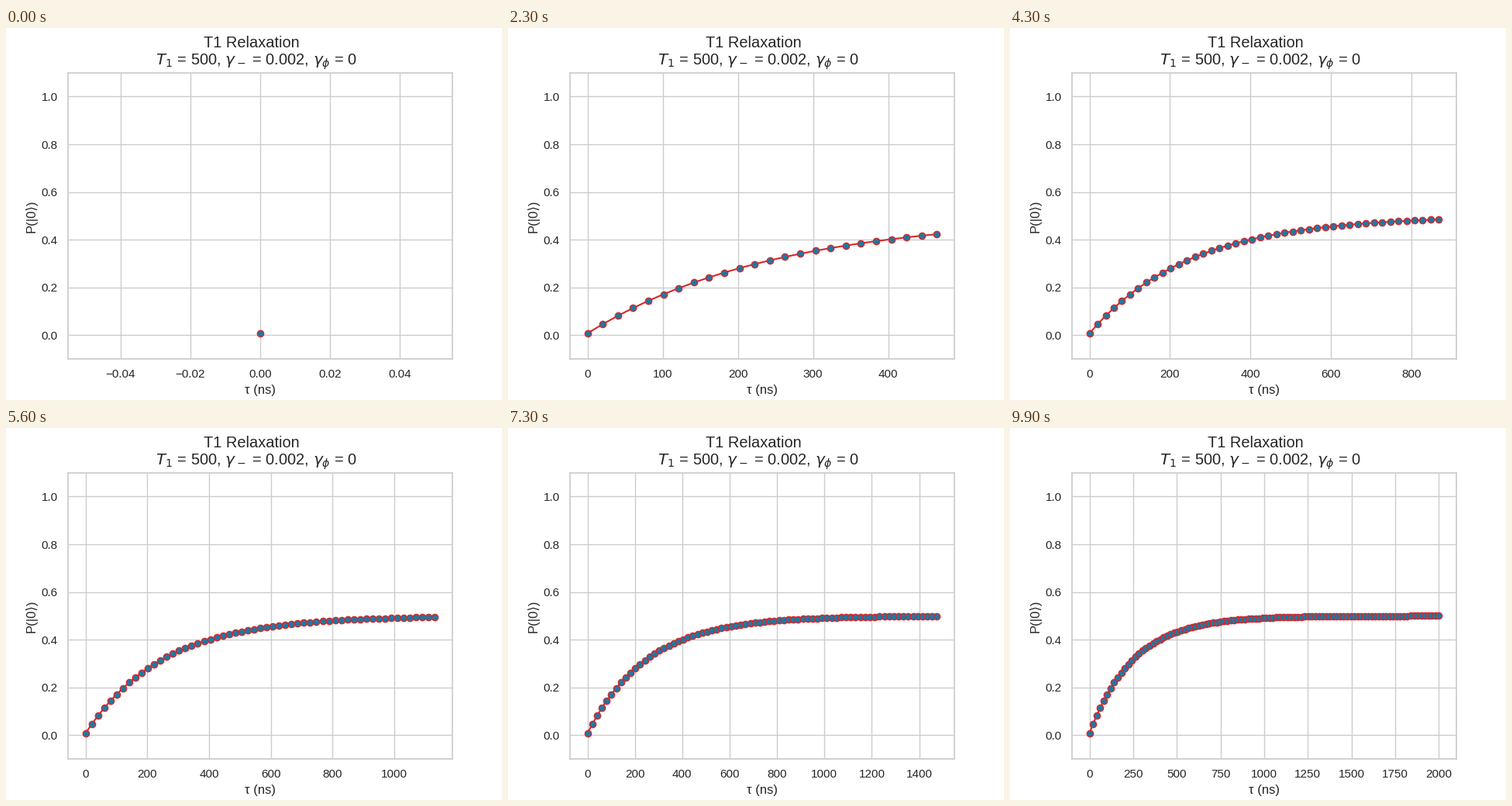
These frames come from a looping animation (640x480 px, 10 s). A matplotlib script:

```python
import matplotlib.pyplot as plt
import numpy as np
from matplotlib.animation import FuncAnimation

FRAMES = 100
T1 = 500
GAMMA = 1 / T1
PULSE = 4  # ns of decay before the first sample

INK, GRID = "0.15", "0.8"

plt.rcParams.update({
    "font.family": ["Liberation Sans", "DejaVu Sans"],
    "font.size": 12,
    "text.color": INK,
    "axes.labelcolor": INK,
    "axes.labelsize": 12,
    "axes.edgecolor": GRID,
    "axes.linewidth": 1.25,
    "axes.axisbelow": True,
    "axes.grid": True,
    "grid.color": GRID,
    "grid.linewidth": 1,
    "lines.solid_capstyle": "round",
    "xtick.color": INK,
    "ytick.color": INK,
    "xtick.labelsize": 11,
    "ytick.labelsize": 11,
    "xtick.major.size": 6,
    "ytick.major.size": 6,
    "xtick.bottom": False,
    "ytick.left": False,
})

tau = np.linspace(0, 2000, FRAMES)
prob = 0.5 * (1 - np.exp(-2 * GAMMA * (tau + PULSE)))

fig, ax = plt.subplots(figsize=(6.4, 4.8), dpi=100)
fig.suptitle("T1 Relaxation \n"
             rf" $T_1$ = {T1}, $\gamma_-$ = {GAMMA}, $\gamma_\phi$ = 0",
             fontsize=14.4)
ax.set(xlabel="τ (ns)", ylabel="P(|0⟩)", ylim=(-0.1, 1.1))
curve, = ax.plot([], [], color="tab:red", lw=1.5, marker="o", ms=6,
                 markerfacecolor="#1f78a4", markeredgewidth=1)


def update(i):
    curve.set_data(tau[:i + 1], prob[:i + 1])
    margin = 0.05 * tau[i] if i else 0.055
    ax.set_xlim(-margin, tau[i] + margin)
    return curve,


anim = FuncAnimation(fig, update, frames=FRAMES, interval=100,
                     repeat=True, repeat_delay=0)
plt.show()
```
